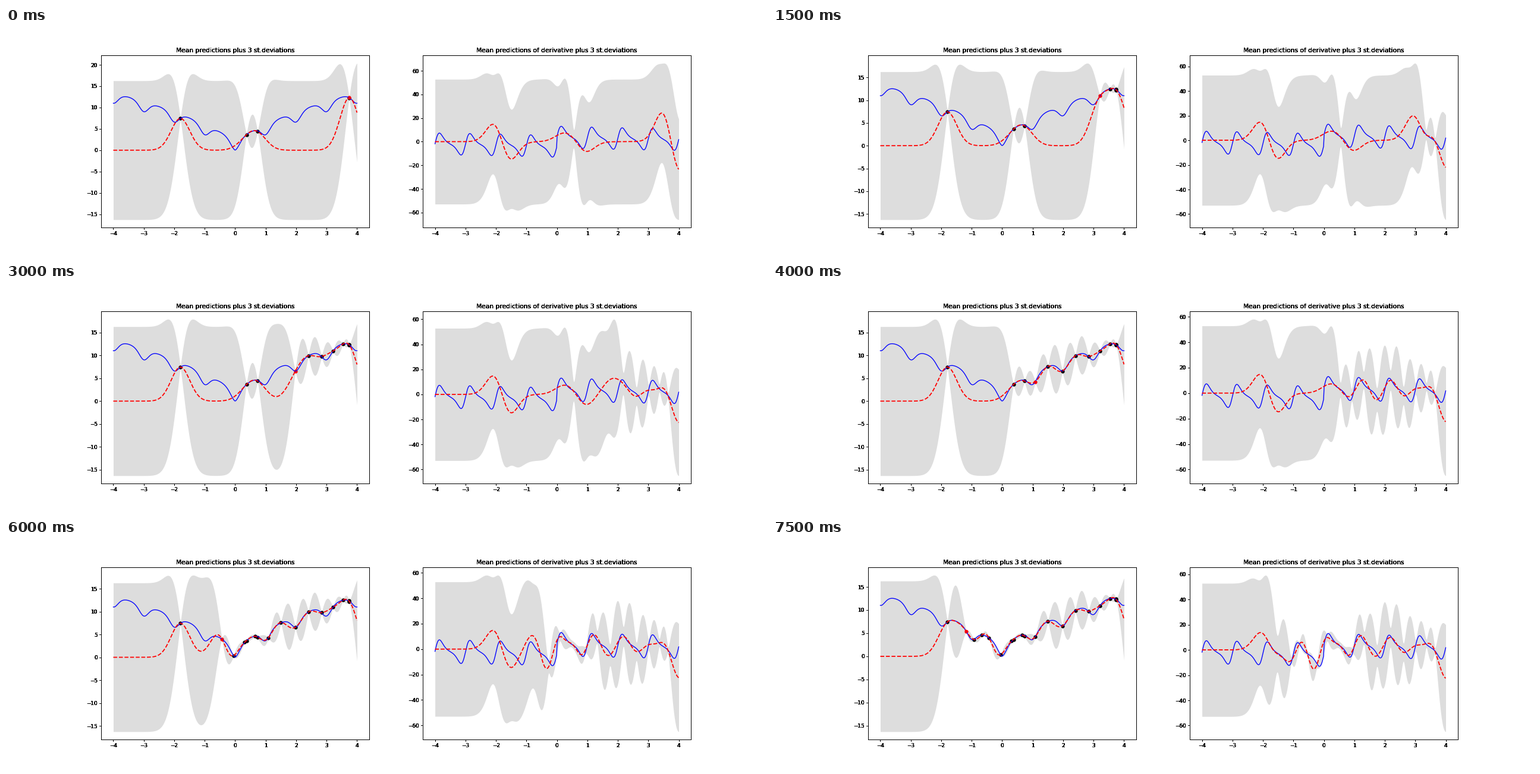
Recreate the animation shown at these times as a matplotlib script. Size 1280 by 384 pixels, loop 8000 ms.

```python
import numpy as np
import matplotlib.pyplot as plt
from matplotlib.animation import FuncAnimation

plt.rcParams["font.family"] = "DejaVu Sans"

FRAMES, STEP_MS = 16, 500
SIGMA, LENGTH, NOISE = 5.425, 0.308, 0.01
LAYERS = 6
X = np.linspace(-4, 4, 400)

# Noisy observations: four to start with, then one more per step.
START = [(-1.797, 7.45), (0.372, 3.64), (0.735, 4.39), (3.741, 12.2)]
WALK = [(3.7413, 12.4), (3.741, 12.3), (3.535, 12.48), (3.213, 10.95),
        (2.838, 9.77), (2.402, 9.92), (1.975, 6.57), (1.503, 7.6),
        (1.086, 4.25), (0.654, 4.61), (0.303, 3.27), (-0.055, 0.34),
        (-0.435, 4.02), (-0.67, 4.61), (-0.928, 3.64), (-1.176, 5.37)]
SAMPLES = np.array(START + WALK)


def ackley(x):
    return 20 * (1 - np.exp(-0.2 * abs(x))) + np.e - np.exp(np.cos(2 * np.pi * x))


def ackley_slope(x):
    wave = 2 * np.pi * np.sin(2 * np.pi * x) * np.exp(np.cos(2 * np.pi * x))
    return 4 * np.sign(x) * np.exp(-0.2 * abs(x)) + wave


def kernel(a, b):
    gap = a[:, None] - b[None, :]
    return gap, SIGMA**2 * np.exp(-gap**2 / (2 * LENGTH**2))


def posterior(xs, ys):
    """Mean and three deviations of the process and of its derivative."""
    cov = kernel(xs, xs)[1] + NOISE * np.eye(len(xs))
    gap, cross = kernel(X, xs)
    result = []
    for k, prior in ((cross, SIGMA**2),
                     (-gap / LENGTH**2 * cross, (SIGMA / LENGTH)**2)):
        weights = np.linalg.solve(cov, k.T)
        var = prior - np.sum(k * weights.T, axis=1)
        result.append((ys @ weights, 3 * np.sqrt(np.maximum(var, 0))))
    return result


class Panel:
    def __init__(self, fig, index, title, truth):
        self.truth = truth
        self.ax = fig.add_subplot(1, 2, index)
        # Stacked transparent axes give the text its heavy look.
        box = self.ax.get_position()
        self.layers = [self.ax] + [fig.add_axes(box, facecolor="none")
                                   for _ in range(LAYERS - 1)]
        for layer in self.layers:
            layer.set_title(title)
            layer.set_xlim(-4.4, 4.4)
        self.band = self.ax.fill_between(X, truth, truth, color="#dddddd", lw=0)
        self.dots, = self.ax.plot([], [], "ko")
        self.latest, = self.ax.plot([], [], "ro")
        self.ax.plot(X, truth, "b-")
        self.mean, = self.ax.plot(X, truth, "r--", lw=2)

    def show(self, mean, dev):
        low, high = mean - dev, mean + dev
        outline = np.concatenate([np.column_stack([X, high]),
                                  np.column_stack([X, low])[::-1]])
        self.band.set_verts([outline])
        self.mean.set_ydata(mean)
        bottom = min(low.min(), self.truth.min())
        top = max(high.max(), self.truth.max())
        pad = 0.05 * (top - bottom)
        for layer in self.layers:
            layer.set_ylim(bottom - pad, top + pad)


fig = plt.figure(figsize=(20, 6), dpi=64)
fig.subplots_adjust(left=0.125, right=0.9, bottom=0.125, top=0.88, wspace=0.2)
left = Panel(fig, 1, "Mean predictions plus 3 st.deviations", ackley(X))
right = Panel(fig, 2, "Mean predictions of derivative plus 3 st.deviations",
              ackley_slope(X))


def update(frame):
    xs, ys = SAMPLES[:len(START) + 1 + frame].T
    for panel, (mean, dev) in zip((left, right), posterior(xs, ys)):
        panel.show(mean, dev)
    left.dots.set_data(xs[:-1], ys[:-1])
    left.latest.set_data(xs[-1:], ys[-1:])


anim = FuncAnimation(fig, update, frames=FRAMES, interval=STEP_MS,
                     repeat=True, repeat_delay=0, blit=False)
plt.show()
```
